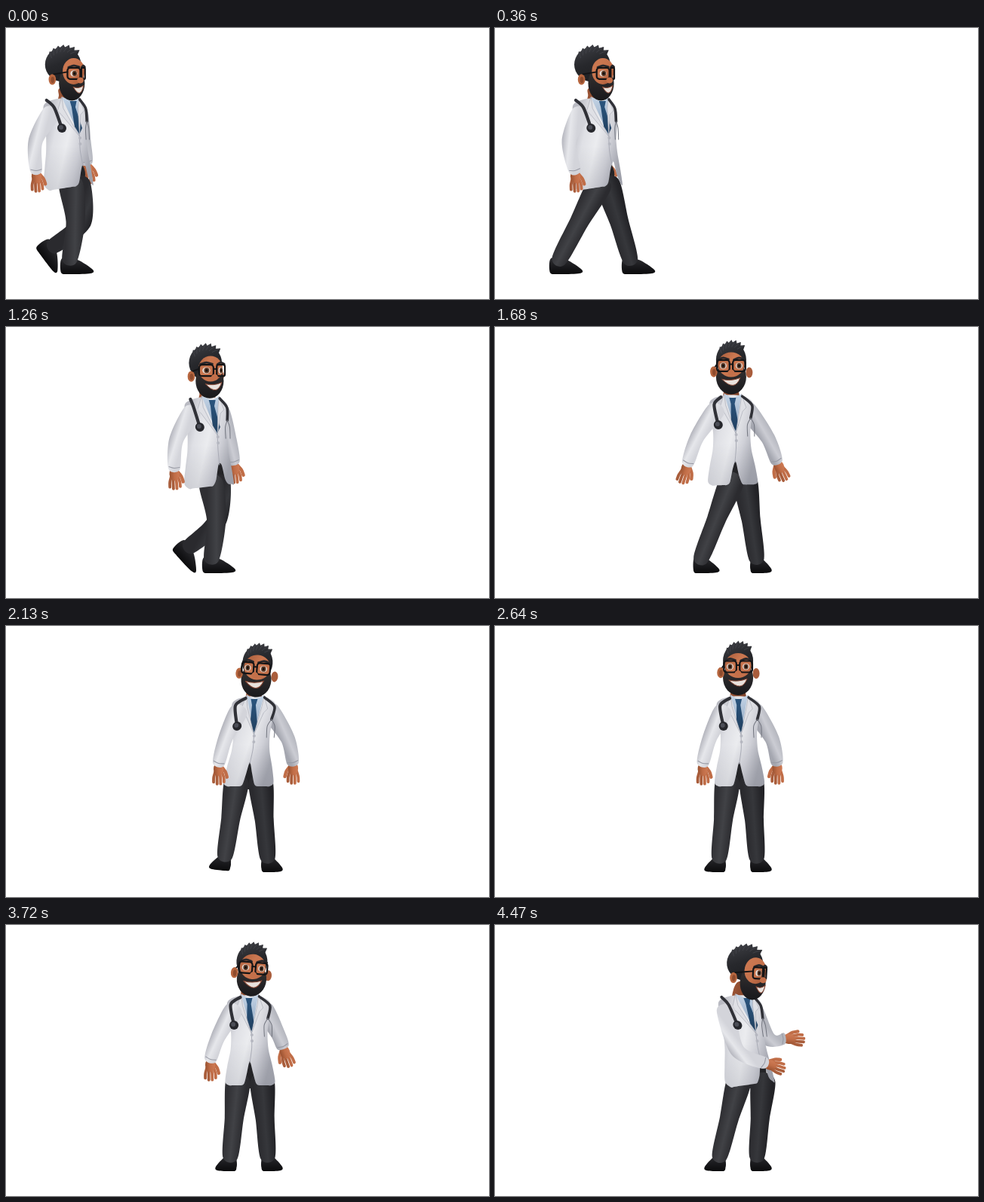
An HTML page with a canvas for the animation above (4500 ms loop, 640x360 px).

```html
<!DOCTYPE html>
<html lang="en">
<head>
<meta charset="utf-8">
<title>Walking doctor</title>
<style>
html, body { margin: 0; width: 100%; height: 100%; overflow: hidden; background: #fff; }
canvas { display: block; width: 640px; height: 360px; }
</style>
</head>
<body>
<canvas id="stage" width="640" height="360"></canvas>
<script>
const c = document.getElementById('stage').getContext('2d');
const LOOP = 4500, TICK = 30, TAU = Math.PI * 2;
const GROUND = 308, CYCLE = 1260, STRIDE = 188, SWING = 560, BONE = 51;

// Joints are relative to the neck; arms are elbow x, y, wrist x, y, hand angle
const WALK = { hip: [5], turn: [.95], yaw: [.97], head: [-.5, -37.5, 0], left: [-41, 54, -40, 94, 1.5], right: [23, 54, 27, 83, 1.45] };
const STAND = { hip: [2], turn: [0], yaw: [0], head: [0, -40, 0], left: [-38, 53, -47, 87, 1.55], right: [45, 53, 52, 86, 1.57] };
const PRESENT = { hip: [14], turn: [.87], yaw: [1.2], head: [9, -35, .06], left: [-4, 70, 33, 87, .32], right: [38, 55, 58, 54, .08] };

const mix = (a, b, k) => a + (b - a) * k;
const clamp = v => Math.max(0, Math.min(1, v));
const ease = (t, from, to) => { const u = clamp((t - from) / (to - from)); return u * u * (3 - 2 * u); };
const bump = (t, mid, reach) => Math.cos(Math.PI / 2 * Math.min(1, Math.abs(t - mid) / reach)) ** 2;
const mixPose = (a, b, k) => Object.fromEntries(
  Object.keys(a).map(key => [key, a[key].map((v, i) => mix(v, b[key][i], k))]));

function trace(pts, closed = true) {
  const n = pts.length;
  const at = i => closed ? pts[(i + n) % n] : pts[Math.max(0, Math.min(n - 1, i))];
  c.beginPath();
  c.moveTo(...pts[0]);
  for (let i = 0; i < (closed ? n : n - 1); i++) {
    const [p, q, r, s] = [at(i - 1), at(i), at(i + 1), at(i + 2)];
    c.bezierCurveTo(q[0] + (r[0] - p[0]) / 7, q[1] + (r[1] - p[1]) / 7,
      r[0] - (s[0] - q[0]) / 7, r[1] - (s[1] - q[1]) / 7, r[0], r[1]);
  }
}
function fill(pts, style) { trace(pts); c.fillStyle = style; c.fill(); }
function poly(pts, style) {
  c.beginPath(); pts.forEach(p => c.lineTo(...p)); c.closePath();
  c.fillStyle = style; c.fill();
}
function stroke(pts, style, width) {
  trace(pts, false);
  c.strokeStyle = style; c.lineWidth = width; c.lineCap = 'round'; c.stroke();
}
function oval(x, y, rx, ry, style) {
  c.beginPath(); c.ellipse(x, y, rx, ry, 0, 0, TAU);
  c.fillStyle = style; c.fill();
}
function ramp(x0, y0, x1, y1, colors) {
  const g = c.createLinearGradient(x0, y0, x1, y1);
  colors.forEach((s, i) => g.addColorStop(i / (colors.length - 1), s));
  return g;
}
function placed(x, y, angle, paint) {
  c.save(); c.translate(x, y); c.rotate(angle); paint(); c.restore();
}

// Tapered three-joint limb, shaded across its width
function limb(joints, radii, colors) {
  const [a, b, d] = joints;
  const angles = [[a, b], [a, d], [b, d]].map(([p, q]) => Math.atan2(q[1] - p[1], q[0] - p[0]));
  const side = s => joints.map((p, i) =>
    [p[0] - s * Math.sin(angles[i]) * radii[i], p[1] + s * Math.cos(angles[i]) * radii[i]]);
  const near = side(1), far = side(-1);
  const cap = [a[0] - Math.cos(angles[0]) * radii[0] * .7, a[1] - Math.sin(angles[0]) * radii[0] * .7];
  fill([...near, ...[...far].reverse(), cap], ramp(...near[1], ...far[1], colors));
}

function hand(x, y, angle, thumb) {
  placed(x, y, angle, () => {
    stroke([[3, thumb * 4], [10, thumb * 9], [17, thumb * 11]], '#c06d47', 4.4);
    for (let i = -1.5; i <= 1.5; i++)
      stroke([[9, i * 2.8], [17, i * 4.4], [27 - Math.abs(i) * 2.5, i * 4.6]], i > 0 ? '#a95d3b' : '#c06d47', 3.8);
    oval(6, 0, 9, 6.6, ramp(0, -7, 0, 7, ['#cf7c56', '#c06d47', '#96502f']));
  });
}

function arm(neck, shoulder, [ex, ey, wx, wy, angle], swing, thumb, colors) {
  const from = (x, y, s) => [neck[0] + x + swing * s, neck[1] + y];
  const elbow = from(ex, ey, .45), wrist = from(wx, wy, 1);
  hand(...wrist, angle, thumb);
  limb([from(...shoulder, 0), elbow, wrist], [12, 9.5, 7.5], colors);
  placed(...wrist, Math.atan2(wrist[1] - elbow[1], wrist[0] - elbow[0]),
    () => stroke([[-3, -7], [-1.5, 0], [-3, 7]], '#989aa4', 1.1));
}

// Feet repeat one stride until they reach their resting place
function foot(t, start, first, rest, turnAt) {
  const n = Math.floor((t - start) / CYCLE), u = clamp((t - start - n * CYCLE) / SWING);
  const from = Math.min(rest, first + n * STRIDE), to = Math.min(rest, first + (n + 1) * STRIDE);
  const effort = (to - from) / STRIDE;
  return {
    x: mix(from, to, u),
    y: GROUND - 20 * effort * Math.sin(Math.PI * u),
    pitch: .95 * effort * Math.sin(Math.PI * u ** .7),
    side: 1 - ease(t, turnAt, turnAt + 400)
  };
}

function leg(hip, f, out, colors) {
  const dx = f.x - hip[0], dy = f.y - hip[1], d = Math.hypot(dx, dy);
  const bow = Math.sqrt(Math.max(0, BONE ** 2 - d * d / 4)) * f.side;
  const knee = [hip[0] + dx / 2 + dy / d * bow, hip[1] + dy / 2 - dx / d * bow];
  placed(f.x, f.y, f.pitch, () => {
    const toe = mix(19 * out, 31, f.side), heel = mix(-8 * out, -11, f.side);
    const leather = ramp(0, 0, 0, 20, ['#29292c', '#18181b', '#0a0a0b']);
    oval(0, 10, 9, 9, leather);
    fill([[heel * .9, -2], [heel, 17], [0, 19], [toe * .9, 18], [toe, 13], [toe * .35, 0]], leather);
  });
  limb([hip, knee, [f.x, f.y + 2]], [16, 12.5, 9.5], colors);
}

function coat(k) {
  const slit = mix(0, 20, k), left = [], right = [], hem = [];
  for (let v = 0; v <= 1; v += .2) {
    const w = 28 + 5 * v - (6.5 - 3.5 * k) * Math.sin(Math.PI * v) ** 2, y = 5 + 106 * v;
    left.push([-w - 2 * k, y]);
    right.unshift([w - 2.5 * k, y]);
  }
  for (let x = -28; x <= 28; x += 4)
    hem.push([x, 116 - 32 * Math.exp(-(((x - slit) / 5) ** 2)) - k * (x + 10) / 6]);
  return [[-12, -3], ...left, ...hem, ...right, [12, -3]];
}

function torso(k) {
  fill(coat(k), ramp(-34, 40, 34, 58, ['#b9bac2', '#dfe0e5', '#ebecef', '#cfd0d7', '#a5a7b0']));
  fill(coat(k), ramp(0, 60, 0, 120, ['rgba(110,112,125,0)', 'rgba(110,112,125,.2)']));
  const low = mix(3, 16, k), l = mix(-10, -6, k), r = mix(13, 17, k), mid = mix(0, 9, k);
  stroke([[low, 46], [low, 66], [mix(0, 19, k), 86]], '#a9abb5', 1);
  poly([[l, -6], [mid, 1], [r, -5], [low, 46]], ramp(0, -5, 0, 40, ['#c4d4e6', '#8fa6c0']));
  poly([[mid - 4, 0], [mid + 5, 0], [mid + 3, 8], [low + 4, 36], [low, 44], [low - 6, 34], [mid - 2, 8]],
    ramp(0, 0, 0, 44, ['#2b557e', '#203f5f']));
  for (const [top, out] of [[l, -6], [r, 6]]) {
    poly([[top, -5], [top + out, 13], [top + out * .2, 18], [low, 47], [top - out * .3, 10]], '#dfe0e5');
    c.strokeStyle = '#adafb9'; c.lineWidth = .7; c.stroke();
  }
  for (const y of [49, 57]) oval(low + .5, y, 2, 2, '#b5b7c0');
}

function stethoscope(k) {
  const x = mix(-20, -7, k), y = 36, ex = mix(25, 26, k);
  stroke([[mix(-11, -27, k), -1], [mix(-24, -16, k), 9], [x, y]], '#303137', 4.2);
  stroke([[mix(14, 18, k), -2], [mix(28, 25, k), 10], [ex, 27]], '#303137', 3.6);
  oval(x, y, 6, 6, '#26272c');
  oval(x - 1, y - 1, 3, 3, '#4c4e57');
  for (const s of [-1, 1]) stroke([[ex, 27], [ex + s * mix(5, 2, k), 36], [ex + s * mix(5, 2, k), 51]], '#71747e', 1);
}

function hair(k) {
  const x = -4 * k, rx = 20 + 4 * k, tone = ramp(-8, -36, 8, 5, ['#3a3b40', '#27282c', '#1f2023']);
  oval(x, -11, rx, 23, tone);
  for (let i = 0; i < 7; i++) {
    const a = -2.5 + i * .27, size = 1.06 + i * .03;
    const at = (da, s) => [x + Math.cos(a + da) * rx * s, -11 + Math.sin(a + da) * 23 * s];
    poly([at(-.25, .9), at(.14, size), at(.42, .8)], tone);
    stroke([at(-.1, .75), at(.1, size - .08)], '#46474d', .8);
  }
}

function head(x, y, yaw, tilt, open) {
  const k = clamp(yaw), drop = 4 * k;
  const around = (lon, r) => r * Math.sin(lon + yaw);
  placed(x, y, tilt, () => {
    const skin = ramp(-18, -15, 24, 16, ['#a95d3c', '#cb7851', '#c4704a', '#9f5535']);
    if (k < .6) oval(24 - 12 * k, 6, 4.5, 7, '#a95d3c');
    hair(k);
    oval(8 * k, 12 + 2 * k, 20 - 3 * k, 23, ramp(0, 5, 0, 36, ['#302d2d', '#232225', '#19191b']));
    oval(10.5 * k, -4.5 + 2.5 * k, 17.5 - 3 * k, 16.5 + k, skin);

    const ear = -23 + 5 * k, earY = 5 + 4 * k;
    oval(ear, earY, 4.8, 7.2, '#b7663f');
    oval(ear + .4, earY + .5, 2.3, 4.2, '#8e4c2e');

    const mx = around(0, 20), my = 15 + drop, mw = 12 * Math.max(.5, Math.cos(yaw));
    c.beginPath();
    c.moveTo(mx - mw, my);
    c.quadraticCurveTo(mx, my + 3, mx + mw, my - 2);
    c.quadraticCurveTo(mx + mw * .4, my + mix(4, 17, open), mx - mw, my);
    c.fillStyle = open > .4 ? '#e9e2dd' : '#a65b48'; c.fill();
    c.strokeStyle = '#8a4834'; c.lineWidth = 1; c.stroke();

    const gy = -3 + drop;
    const lenses = [-.5, .5].map(lon => ({
      x: around(lon, 22 + k),
      q: Math.max(.25, Math.cos(lon + yaw)),
      seen: Math.cos(lon + yaw) > .2
    }));
    for (const { x: lx, q, seen } of lenses) {
      if (seen) {
        oval(lx, gy, 5.2 * q, 4.2, '#e4dcd6');
        oval(lx + k, gy, 3.5 * q, 3.6, '#5f3a26');
        oval(lx + k, gy, 1.7 * q, 1.9, '#121212');
      }
      stroke([[lx - 8 * q, gy - 8], [lx, gy - 10.5], [lx + 8 * q, gy - 8.5]], '#28272a', 2.8);
      c.beginPath();
      c.roundRect(lx - 9.5 * q, gy - 7.5, 19 * q, 15, 4 * q);
      c.strokeStyle = '#141416'; c.lineWidth = 2.2; c.stroke();
    }
    const [a, b] = lenses;
    if (b.seen) stroke([[a.x + 9.5 * a.q, gy - 2], [b.x - 9.5 * b.q, gy - 2]], '#141416', 2);
    stroke([[a.x - 9.5 * a.q, gy - 2], [ear + 2, gy + 1]], '#141416', 1.8);
    oval(around(0, 23), 6 + drop, 4.4, 4, '#c4704a');
  });
}

function draw(t) {
  c.fillStyle = '#fff';
  c.fillRect(0, 0, 640, 360);

  const stop = ease(t, 900, 1950), present = ease(t, 3760, 4340);
  const pose = mixPose(mixPose(WALK, STAND, stop), PRESENT, present);
  const spread = bump(t, 1690, 380), nod = bump(t, 2130, 450), greet = bump(t, 3710, 380);

  const brake = clamp((t - 1260) / 840);
  const nx = 80 + .148 * Math.min(t, 1260) + 62 * brake * (2 - brake) - 7 * ease(t, 2130, 2750) + 4 * present;
  const ny = 97 - 3 * bump(t, 1650, 420), neck = [nx, ny];
  const hip = pose.hip[0] - 9 * nod, k = pose.turn[0];
  const yaw = mix(WALK.yaw[0], 0, ease(t, 800, 1700)) + PRESENT.yaw[0] * present - .1 * nod + .12 * greet;
  const swing = 13 * Math.sin(TAU * t / 1300) * (1 - stop);

  const left = pose.left.map((v, i) => v + spread * [-8, 0, -14, 0, .35][i] + greet * [-3, 0, -4, -4, 0][i]);
  const right = pose.right.map((v, i) => v + spread * [8, 0, 15, 0, -.4][i] + greet * [-6, -5, -6, -20, -.35][i]);
  const near = foot(t, 470, 84, 297, 1590), far = foot(t, -205, -8, 347, 1270);

  const mid = nx + hip, hipY = ny + 110;
  arm(neck, [mix(21, 16, k), 15], right, -swing, k > .5 ? -1 : 1, ['#a4a6af', '#cbccd3', '#b4b6be']);
  oval(mid, ny + 98, 20, 22, '#242427');
  leg([mid + mix(16, 11, far.side), hipY], far, 1, ['#2a2a2e', '#36373b', '#222226']);
  leg([mid + mix(-16, 1, near.side), hipY], near, -1, ['#2f2f33', '#414246', '#2b2b2f']);
  const [hx, hy, tilt] = pose.head;
  limb([[nx + hx * .5, ny - 16], [nx, ny - 8], [nx, ny + 2]], [10, 10, 10], ['#9a5435', '#7f432a']);

  // The trunk leans so that the hem follows the hips
  const leaning = paint => { c.save(); c.transform(1, 0, hip / 110, 1, nx, ny); paint(k); c.restore(); };
  leaning(torso);
  arm(neck, [-20, 16], left, swing, -1, ['#b5b6be', '#e6e7eb', '#d3d4da']);
  leaning(stethoscope);
  head(nx + hx + 4 * (nod + greet), ny + hy + 2.5 * (nod + greet), yaw, tilt + .08 * (nod + greet), 1 - .85 * bump(t, 720, 400));
}

const start = performance.now();
function tick(now) {
  const t = Math.max(0, now - start) % LOOP;
  draw(Math.floor(t / TICK) * TICK);
  requestAnimationFrame(tick);
}
draw(0);
requestAnimationFrame(tick);
</script>
</body>
</html>
```
